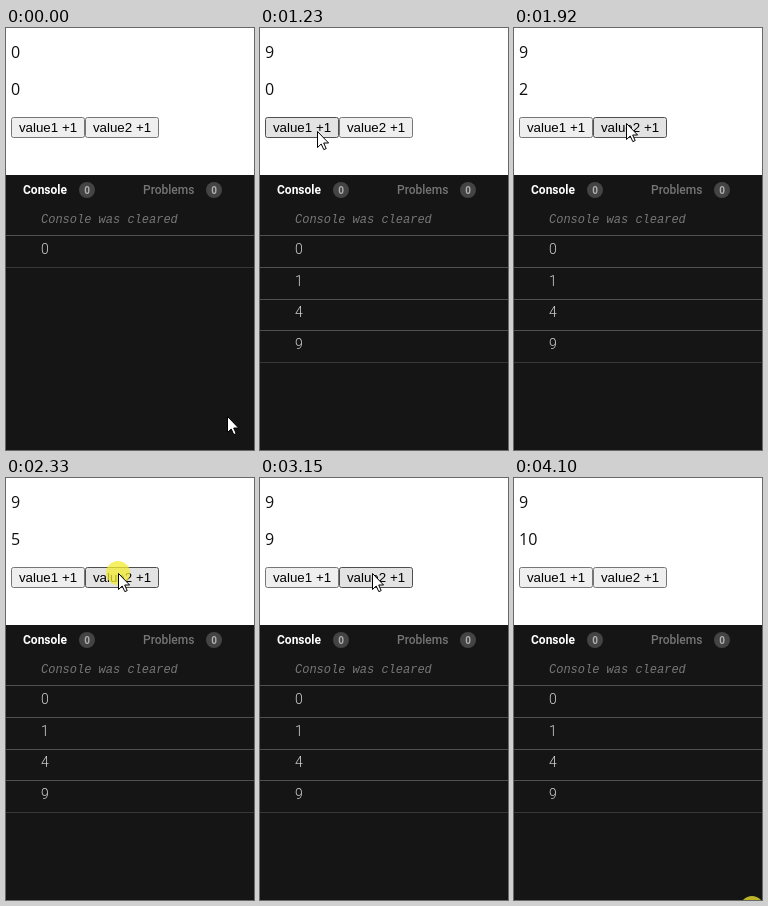
Recreate the animation shown at these times as an HTML page. Size 248 by 422 pixels, loop 4.17 s.

```html
<!DOCTYPE html>
<html lang="en">
<head>
<meta charset="utf-8">
<title>Counter and console</title>
<style>
  html, body { margin: 0; width: 100%; height: 100%; overflow: hidden; background: #fff; }
  svg { display: block; width: 248px; height: 422px; }
  .value { font: 16px "Open Sans", sans-serif; fill: #111; }
  .button rect { fill: #efefef; stroke: #767676; }
  .button.hover rect { fill: #e3e3e3; stroke: #4f4f4f; }
  .button text { font: 13.333px "Liberation Sans", sans-serif; text-anchor: middle; fill: #000; }
  .tab { font: 500 12px Roboto, sans-serif; fill: #757575; }
  .tab.active { font-weight: 700; fill: #fff; }
  .badge { font: 700 10px Roboto, sans-serif; text-anchor: middle; fill: #b0b0b0; }
  .notice { font: italic 12px "Liberation Mono", monospace; fill: #777; }
  .log text { font: 300 14px Roboto, sans-serif; fill: #d0d0d0; }
  .line { fill: #505050; }
  .line.last { fill: #373737; }
</style>
</head>
<body>
<svg viewBox="0 0 248 422">
  <text id="value1" class="value" x="5" y="30">0</text>
  <text id="value2" class="value" x="5" y="67">0</text>
  <g id="button1" class="button">
    <rect x="5.5" y="89.5" width="73" height="20" rx="2"/>
    <text x="42" y="104">value1 +1</text>
  </g>
  <g id="button2" class="button">
    <rect x="79.5" y="89.5" width="73" height="20" rx="2"/>
    <text x="116" y="104">value2 +1</text>
  </g>
  <rect y="147" width="248" height="275" fill="#151515"/>
  <text class="tab active" x="17" y="166">Console</text>
  <text class="tab" x="137" y="166">Problems</text>
  <circle cx="81" cy="162" r="8" fill="#444"/>
  <circle cx="208" cy="162" r="8" fill="#444"/>
  <text class="badge" x="81" y="165.5">0</text>
  <text class="badge" x="208" y="165.5">0</text>
  <text class="notice" x="35" y="195">Console was cleared</text>
  <rect class="line" y="207" width="248" height="1"/>
  <g id="logs"></g>
  <g id="pointer">
    <circle id="press" r="12" fill="#f2eb30" opacity=".75"/>
    <path d="M.5 .5V16.5L4.2 13L6.8 18.6L9.2 17.6L6.7 12H11.6Z" fill="#fff" stroke="#000" stroke-width="1"/>
  </g>
</svg>
<script>
const LOOP = 4170;
const $ = id => document.getElementById(id);

// Moments at which each counter rises and each log row appears
const value1Ticks = [730, 940, 1160];
const value2Ticks = [1780, 1920, 2060, 2200, 2270, 2400, 2540, 3010, 3150, 3290];
const logTimes = [0, 800, 1020, 1230];

// Mouse button held: [down, up]
const presses = [
  [660, 730], [870, 940], [1090, 1160],
  [1710, 1780], [1850, 1920], [1990, 2060], [2130, 2200], [2330, 2400], [2470, 2610],
  [2940, 3010], [3080, 3150], [3220, 3290], [4100, LOOP]
];

// Pointer moves in discrete steps, the first one landing at `start`
const home = [221, 388], left = [57, 103], right = [112, 95];
const smooth = p => p * p * (3 - 2 * p);
const linear = p => p;
const moves = [
  { start: 70, end: 530, steps: 8, from: home, to: left, ease: smooth },
  { start: 1300, end: 1510, steps: 4, from: left, to: right, ease: smooth },
  { start: 3360, end: 3430, steps: 2, from: right, to: [192, 232], ease: p => p ** 1.3 },
  { start: 3500, end: 3500, steps: 1, from: [192, 232], to: [237, 309], ease: linear },
  { start: 3570, end: 3570, steps: 1, from: [237, 309], to: [238, 430], ease: linear }
];

function pointerAt(t) {
  const move = moves.findLast(m => t >= m.start);
  if (!move) return home;
  const { start, end, steps, from, to, ease } = move;
  const interval = (end - start) / Math.max(1, steps - 1);
  const step = t >= end ? steps : Math.floor((t - start) / interval) + 1;
  const p = ease(step / steps);
  return from.map((v, i) => Math.round(v + (to[i] - v) * p));
}

const count = (times, t) => times.filter(time => t >= time).length;

$("logs").innerHTML = logTimes.map((_, i) => {
  const y = Math.round(i * 31.7);
  return `<g class="log"><text x="35" y="${226 + y}">${i * i}</text>
    <rect class="line" y="${239 + y}" width="248" height="1"/></g>`;
}).join("");
const rows = [...$("logs").children];

function draw() {
  const t = performance.now() % LOOP;
  const [x, y] = pointerAt(t);
  const overButtons = y >= 89 && y < 110;
  const shown = count(logTimes, t);

  $("value1").textContent = count(value1Ticks, t) ** 2;
  $("value2").textContent = count(value2Ticks, t);
  $("button1").classList.toggle("hover", overButtons && x >= 5 && x < 79);
  $("button2").classList.toggle("hover", overButtons && x >= 79 && x < 153);
  rows.forEach((row, i) => {
    row.style.display = i < shown ? "" : "none";
    row.lastElementChild.classList.toggle("last", i === shown - 1);
  });
  $("pointer").setAttribute("transform", `translate(${x} ${y})`);
  $("press").style.display = presses.some(([down, up]) => t >= down && t < up) ? "" : "none";
  requestAnimationFrame(draw);
}
draw();
</script>
</body>
</html>
```
